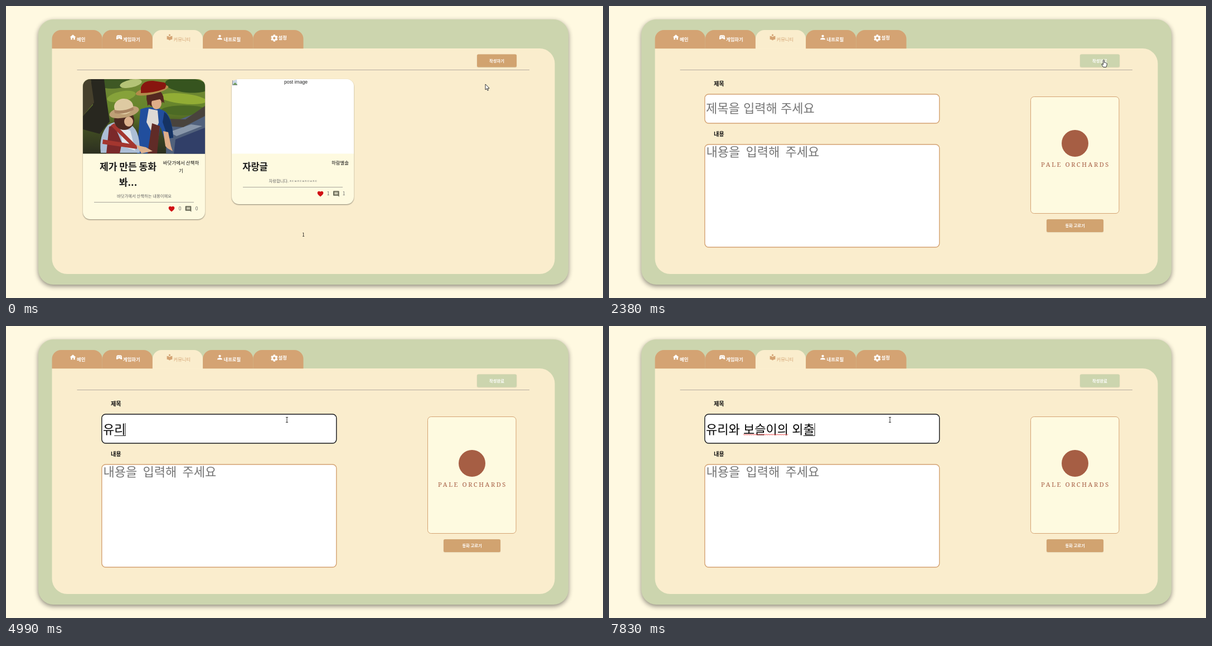
These frames come from a looping animation (1071x523 px, 8000 ms). An HTML page with a canvas:

```html
<!DOCTYPE html>
<html lang="ko">
<head>
<meta charset="utf-8">
<title>커뮤니티 글쓰기</title>
<style>
  html, body { margin: 0; width: 100%; height: 100%; overflow: hidden; background: #fff9e1; }
  canvas { display: block; }
</style>
</head>
<body>
<canvas id="stage" width="1071" height="523"></canvas>
<script>
const ctx = document.getElementById('stage').getContext('2d');
const LOOP = 8000;
const PAGE_SWITCH = 2380, FOCUS = 3460, SQUIGGLE = 7080;
const SANS = '"Noto Sans CJK KR", "Noto Sans KR", "Noto Sans CJK", sans-serif';
const C = {
  page: '#fff9e1', green: '#ccd5ae', sand: '#faedcd', tan: '#d4a373',
  button: '#d1a370', cream: '#fefae0', ink: '#111', grey: '#666', brown: '#a65e44'
};

const ICONS = {
  home: 'M10 20v-6h4v6h5v-8h3L12 3 2 12h3v8z',
  game: 'M21.58 16.09l-1.09-7.66C20.21 6.46 18.52 5 16.53 5H7.47C5.48 5 3.79 6.46 3.51 8.43l-1.09 7.66C2.2 17.63 3.39 19 4.94 19c.68 0 1.32-.27 1.8-.75L9 16h6l2.25 2.25c.48.48 1.13.75 1.8.75 1.56 0 2.75-1.37 2.53-2.91zM11 11H9v2H8v-2H6v-1h2V8h1v2h2zM14 8h2v2h-2zM16 11h2v2h-2z',
  reader: 'M12 11.55C9.64 9.35 6.48 8 3 8v11c3.48 0 6.64 1.35 9 3.55 2.36-2.19 5.52-3.55 9-3.55V8c-3.48 0-6.64 1.35-9 3.55zM12 8a3 3 0 1 0 0-6 3 3 0 0 0 0 6z',
  person: 'M12 12a4 4 0 1 0 0-8 4 4 0 0 0 0 8zm0 2c-2.67 0-8 1.34-8 4v2h16v-2c0-2.66-5.33-4-8-4z',
  heart: 'M12 21.35l-1.45-1.32C5.4 15.36 2 12.28 2 8.5 2 5.42 4.42 3 7.5 3c1.74 0 3.41.81 4.5 2.09C13.09 3.81 14.76 3 16.5 3 19.58 3 22 5.42 22 8.5c0 3.78-3.4 6.86-8.55 11.54z',
  comment: 'M22 4c0-1.1-.9-2-2-2H4c-1.1 0-2 .9-2 2v12c0 1.1.9 2 2 2h14l4 4zM18 14H6v-2h12zM18 11H6V9h12zM18 8H6V6h12z'
};
for (const name in ICONS) ICONS[name] = new Path2D(ICONS[name]);
ICONS.gear = gearPath();

function gearPath() {
  const p = new Path2D(), teeth = 6;
  for (let i = 0; i < teeth; i++) {
    const mid = i * Math.PI * 2 / teeth;
    for (const [r, a] of [[7.6, -.4], [10.2, -.25], [10.2, .25], [7.6, .4]])
      p.lineTo(12 + r * Math.sin(mid + a), 12 - r * Math.cos(mid + a));
  }
  p.closePath();
  p.moveTo(15.5, 12);
  p.arc(12, 12, 3.5, 0, 7);
  return p;
}

function icon(name, cx, cy, color, size = 12.8) {
  ctx.save();
  ctx.translate(cx - size / 2, cy - size / 2);
  ctx.scale(size / 24, size / 24);
  ctx.fillStyle = color;
  ctx.fill(ICONS[name], 'evenodd');
  ctx.restore();
}

// y is the visual middle of the Hangul glyphs.
function text(str, x, y, size, { weight = 400, color = C.ink, align = 'left', family = SANS } = {}) {
  ctx.font = `${weight} ${size}px ${family}`;
  ctx.fillStyle = color;
  ctx.textAlign = align;
  ctx.fillText(str, x, y + size * .38);
}

function box(x, y, w, h, radius, fill, stroke, lineWidth = 1) {
  ctx.beginPath();
  ctx.roundRect(x, y, w, h, radius);
  ctx.fillStyle = fill;
  ctx.fill();
  if (!stroke) return;
  ctx.strokeStyle = stroke;
  ctx.lineWidth = lineWidth;
  ctx.stroke();
}

function shadowed(blur, dy, alpha, draw) {
  ctx.save();
  ctx.shadowColor = `rgba(0,0,0,${alpha})`;
  ctx.shadowBlur = blur;
  ctx.shadowOffsetY = dy;
  draw();
  ctx.restore();
}

function rule(x, y, w, color = '#a9a49a') {
  ctx.fillStyle = color;
  ctx.fillRect(x, y, w, 1);
}

function shape(color, d) {
  ctx.fillStyle = color;
  ctx.fill(new Path2D(d));
}

function blob(color, x, y, rx, ry, turn = 0) {
  ctx.fillStyle = color;
  ctx.beginPath();
  ctx.ellipse(x, y, rx, ry, turn, 0, 7);
  ctx.fill();
}

function button(x, y, w, h, label, color) {
  shadowed(2, 0.5, .12, () => box(x, y, w, h, 2.5, color));
  text(label, x + w / 2, y + h / 2, 7.3, { weight: 700, color: '#fff', align: 'center' });
}

function frame() {
  ctx.fillStyle = C.page;
  ctx.fillRect(0, 0, 1071, 523);
  shadowed(9, 3, .45, () => box(58, 24, 951, 475, 27, C.green));
  box(82.5, 76, 902, 404, [0, 27, 27, 27], C.sand);
  const tabs = [
    ['home', '메인', 120, 127, 60], ['game', '게임하기', 203, 210, 60],
    ['reader', '커뮤니티', 293.5, 300.5, 60], ['person', '내프로필', 383.5, 390.5, 60],
    ['gear', '설정', 481.3, 488.5, 56.5]
  ];
  tabs.forEach(([name, label, iconX, labelX, y], i) => {
    const active = i === 2, color = active ? C.tan : '#fff';
    box(82.5 + 90.2 * i, 43, 90.2, 33.2, [16, 16, 0, 0], active ? C.sand : C.tan);
    icon(name, iconX, i === 4 ? 57.5 : 56, color, i === 4 ? 15 : 13);
    text(label, labelX, y, 8.3, { weight: active ? 400 : 700, color });
  });
  rule(127.5, 114, 811.5, '#b5aca0');
}

function illustration() {
  const g = ctx.createLinearGradient(0, 131, 0, 264);
  g.addColorStop(0, '#748a38');
  g.addColorStop(.4, '#65842a');
  g.addColorStop(.7, '#3f4a22');
  g.addColorStop(1, '#2c2f20');
  ctx.save();
  ctx.beginPath();
  ctx.roundRect(138, 131, 219, 133.5, [13, 13, 0, 0]);
  ctx.clip();
  ctx.fillStyle = g;
  ctx.fillRect(138, 131, 219, 134);
  blob('#3e5824', 190, 136, 34, 12);
  blob('#b4c377', 224, 139, 20, 7, -.2);
  blob('#36541f', 325, 142, 40, 13, .1);
  blob('#92ad35', 318, 166, 42, 9, .1);
  blob('#86a23a', 207, 162, 26, 9, -.2);
  blob('#4c6a25', 320, 187, 42, 9);
  shape('#28271f', 'M152 131h24l4 34 6 42-18 22-30-8v-24l18-20z');
  shape('#46402c', 'M138 131h14l6 42-20 24z');
  shape('#51617c', 'M288 212l69-26v79h-70z');
  shape('#313f68', 'M304 239l53-21v47h-56z');
  shape('#8997aa', 'M292 226l40-14 20 3-46 18z');
  shape('#49433d', 'M284 202l38 1 35-24v18l-39 20-34-2z');
  // standing figure in blue
  shape('#214e9d', 'M241 185q22-9 43 3 14 9 16 48l-16 2-7-22-8 48h-34z');
  shape('#153363', 'M284 190q14 9 16 46l-9 1-10-29z');
  shape('#ded9d5', 'M256 184l16 3 2 22-10 22-12-23z');
  shape('#602b27', 'M262 210l14 5-5 49h-17z');
  blob('#542820', 267, 165, 15, 16);
  blob('#dfad88', 270, 174, 9, 11);
  shape('#542820', 'M252 160q14-9 30 1l2 13-8-7-14 3-8 9z');
  blob('#b48b4b', 262, 151, 30, 7, -.22);
  shape('#88160f', 'M242 146q4-13 22-12l20 3q6 3 1 11-20 8-43 8z');
  shape('#dfad88', 'M282 224l9 2 5 25 3 9-9-5-4-4z');
  // seated figure with a sun hat
  shape('#acbed6', 'M183 213q16-9 35-3 23 7 22 53h-70q-4-31 13-50z');
  shape('#e1e6ed', 'M205 218l18 5 9 36-23-8z');
  shape('#7b292a', 'M185 216l9-3 14 32-4 19h-24z');
  shape('#a4362f', 'M188 214l6-4 39 39-3 6zM174 239l61 10v7l-62-9z');
  blob('#4b2921', 212, 204, 18, 18);
  blob('#ddb28e', 220, 207, 8, 9);
  blob('#bea076', 212, 190, 27, 10, -.2);
  blob('#decaa2', 211, 180, 17, 14, -.1);
  shape('#a88462', 'M194 186q16 4 34-5l1 5q-17 9-34 6z');
  shape('#ddb28e', 'M233 249l18 4 12 7-20 4z');
  ctx.restore();
}

function card(x, bottom, drawImage, likes, ruleY) {
  shadowed(2, 1, .45, () => box(x, 131, 219, bottom - 131, 13, C.cream));
  drawImage();
  rule(x + 20, ruleY, 179, '#a8a69c');
  const y = ruleY + 12.5;
  icon('heart', x + 159, y, '#d10f14');
  icon('comment', x + 187 + (x > 300 ? .3 : 2), y, '#666654');
  const numX = x > 300 ? [578, 606] : [312, 342];
  numX.forEach(nx => text(likes, nx, y - 1, 8.3, { color: C.grey, align: 'center' }));
}

function brokenImage() {
  box(405, 131, 219, 133.5, [13, 13, 0, 0], '#fff');
  shape('#c9d6e6', 'M407 134l7-2 1 9h-8z');
  shape('#6d9c57', 'M407 141l4-4 4 4z');
  shape('#8c9299', 'M406 133h1v9h-1zM407 141h8v1h-8z');
  text('post image', 520, 136, 8.6, { align: 'center', color: '#222', family: '"Liberation Sans", Arial, sans-serif' });
}

function listPage(t) {
  button(845, 86.5, 71, 23, '작성하기', C.button);
  if (t >= 2180) {
    ctx.save();
    ctx.beginPath();
    ctx.roundRect(845, 86.5, 71, 23, 2.5);
    ctx.clip();
    blob('rgba(255,255,255,.2)', 887, 97, 5 + (t - 2180) * .065, 5 + (t - 2180) * .065);
    ctx.restore();
  }
  card(138, 382, illustration, '0', 351);
  const title = { weight: 700, color: '#1c1c1c', align: 'center' };
  text('제가 만든 동화', 219, 288, 17.1, title);
  text('봐...', 219, 315.5, 17.1, title);
  text('바닷가에서 산책하', 314, 281, 8.5, { align: 'center' });
  text('기', 314, 294.5, 8.5, { align: 'center' });
  text('바닷가에서 산책하는 내용이에요', 248, 340.5, 7.35, { color: C.grey, align: 'center' });

  card(405, 355, brokenImage, '1', 324);
  text('자랑글', 447, 288, 16.5, title);
  text('하람별솔', 599.5, 281, 8.4, { align: 'center' });
  text('자랑합니다.', 471.5, 313.5, 7.3, { color: C.grey });
  text('ㅈㄷㅂㅈㄷㅂㅈㄷㅂㅈㄷ', 508, 313.5, 5, { color: C.grey });
  text('1', 533.5, 410, 8.3, { align: 'center' });
}

const KEYS = [
  [4060, 'ㅇ'], [4260, '유'], [4400, '율'], [4990, '유리'], [5200, '유링'],
  [5330, '유리오'], [5400, '유리와'], [5530, '유리와 '], [5730, '유리와 ㅂ'],
  [5870, '유리와 보'], [6070, '유리와 봇'], [6130, '유리와 보스'], [6270, '유리와 보슬'],
  [6470, '유리와 보슬ㅇ'], [6600, '유리와 보슬이'], [6740, '유리와 보슬잉'],
  [6800, '유리와 보슬이으'], [6870, '유리와 보슬이의'], [7010, '유리와 보슬이의 '],
  [7200, '유리와 보슬이의 ㅇ'], [7340, '유리와 보슬이의 오'], [7400, '유리와 보슬이의 외'],
  [7550, '유리와 보슬이의 욏'], [7700, '유리와 보슬이의 외추'], [7830, '유리와 보슬이의 외출']
];

function titleField(t) {
  const focused = t >= FOCUS, left = 174, size = 22;
  box(171.8, 158, 421, 52, 7, '#fff', focused ? '#14161a' : C.tan, 1.4);
  const [keyTime, typed] = KEYS.findLast(k => k[0] <= t) || [FOCUS, ''];
  ctx.wordSpacing = '1.4px';
  text(typed || '제목을 입력해 주세요', left, typed ? 185 : 183, size,
    { weight: 300, color: typed ? '#000' : '#757575' });
  const xAt = n => left + ctx.measureText(typed.slice(0, n)).width;
  const end = xAt(typed.length);
  ctx.fillStyle = '#222';
  if (typed && !typed.endsWith(' ')) {
    const start = xAt(typed.length - 1);
    ctx.fillRect(start, 196, end - start, 1);
  }
  if (focused && (t - keyTime) % 1040 < 520) ctx.fillRect(Math.round(end) - .5, 174, 1, 23);
  if (t >= SQUIGGLE) {
    ctx.beginPath();
    for (let x = xAt(4), i = 0; x <= xAt(8); x += 1.6, i++) ctx.lineTo(x, i % 2 ? 195.5 : 193.5);
    ctx.strokeStyle = '#f04444';
    ctx.lineWidth = .9;
    ctx.stroke();
  }
  ctx.wordSpacing = '0px';
}

function formPage(t) {
  button(845, 86.5, 71, 23, '작성완료', C.green);
  text('제목', 188, 139, 10.2, { weight: 700 });
  text('내용', 188, 229, 10.2, { weight: 700 });
  titleField(t);
  box(171.8, 248, 421, 184, 7, '#fff', C.tan, 1.4);
  ['내용을', '입력해', '주세요'].forEach((word, i) =>
    text(word, 174.5 + 71 * i, 261, 22, { weight: 300, color: '#757575' }));
  box(756.5, 162.5, 158.5, 209, 6, C.cream, C.tan);
  blob(C.brown, 836, 246, 24, 24);
  ctx.letterSpacing = '2.6px';
  text('PALE ORCHARDS', 837, 284, 11, { color: C.brown, align: 'center', family: '"Noto Serif", serif' });
  ctx.letterSpacing = '0px';
  button(785, 382, 102, 23, '동화 고르기', C.button);
}

const PATH = [[0, 860, 140], [990, 860, 140], [1450, 886, 113.5], [1780, 887.5, 97],
  [2650, 887.5, 97], [3240, 504, 168], [LOOP, 504, 168]];

function pointerAt(t) {
  const i = PATH.findLastIndex(p => p[0] <= t);
  const [t0, x0, y0] = PATH[i], [t1, x1, y1] = PATH[i + 1];
  const u = (t - t0) / (t1 - t0), e = u * u * (3 - 2 * u);
  return [x0 + (x1 - x0) * e, y0 + (y1 - y0) * e];
}

const ARROW = new Path2D('M0 0v10l2.3-2.1 1.6 3.5 1.6-.7-1.5-3.4h3.1z');
const HAND = new Path2D('M-1 .2q1-1 2 0v4.3l1-.5 1 .7 1-.2.8.9.9.2v3.2l-1.2 3.7h-5.2l-3-4.7q0-1.2 1.2-1l1.5 1.2z');

function pointer(t) {
  const [x, y] = pointerAt(t);
  ctx.save();
  ctx.translate(x, y);
  ctx.lineWidth = .9;
  ctx.strokeStyle = '#222';
  ctx.fillStyle = '#fff';
  const overField = t > PAGE_SWITCH && x < 593 && y > 158;
  const overButton = x > 845 && x < 916 && y > 86 && y < 110;
  if (overField) {
    ctx.fillStyle = '#333';
    ctx.fillRect(-.5, -4, 1, 8);
    ctx.fillRect(-2, -5, 4, 1);
    ctx.fillRect(-2, 4, 4, 1);
  } else {
    const form = overButton ? HAND : ARROW;
    ctx.fill(form);
    ctx.stroke(form);
  }
  ctx.restore();
}

function draw(now) {
  const t = now % LOOP;
  frame();
  (t < PAGE_SWITCH ? listPage : formPage)(t);
  pointer(t);
}

let start;
function tick(now) {
  start ??= now;
  draw(now - start);
  requestAnimationFrame(tick);
}
requestAnimationFrame(tick);
</script>
</body>
</html>
```
